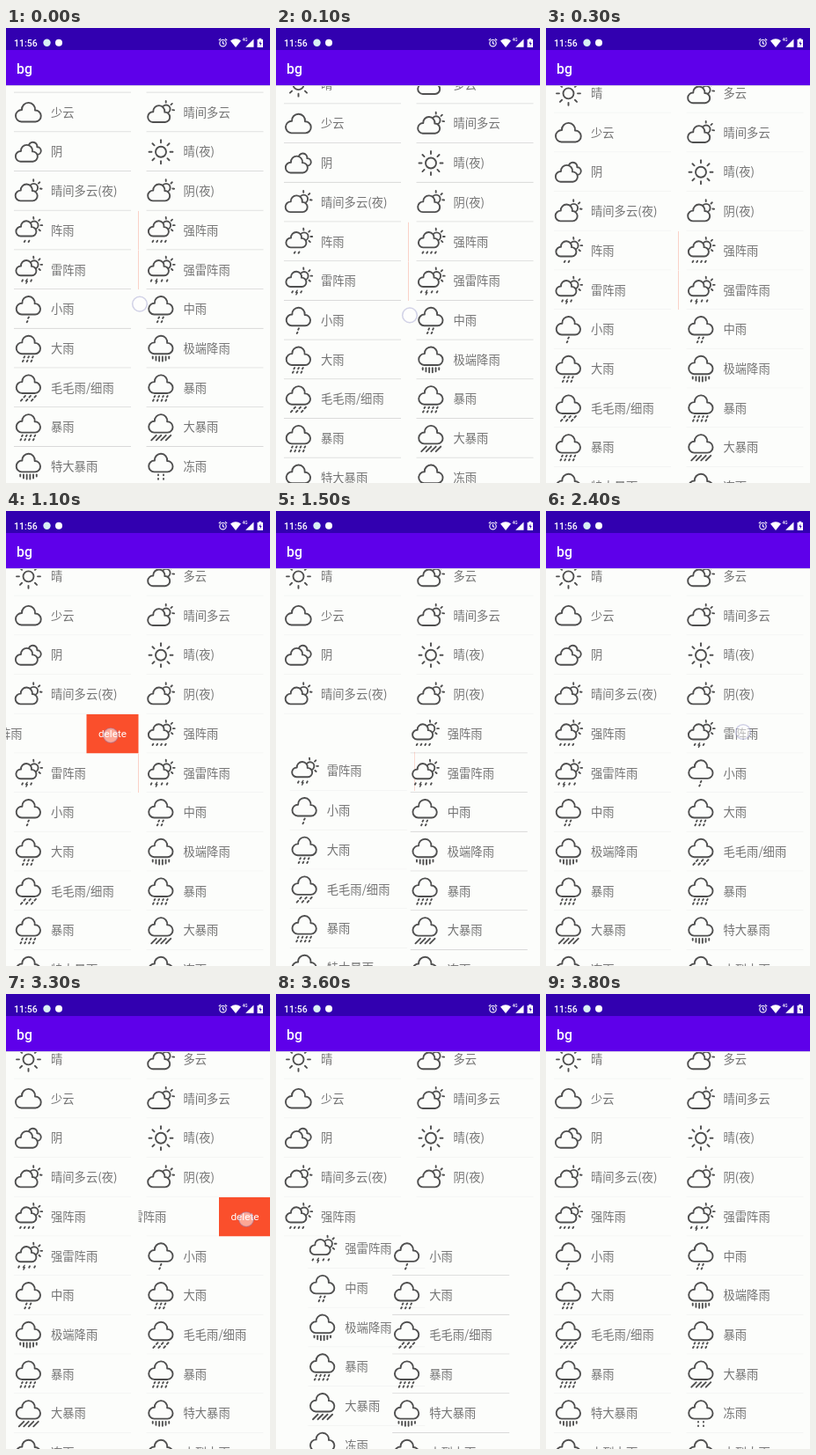
Recreate the animation shown at these times as an HTML page. Size 300x517 px, loop 4500 ms.

```html
<!DOCTYPE html>
<html lang="zh-CN">
<head>
<meta charset="utf-8">
<style>
  html, body { margin: 0; width: 100%; height: 100%; overflow: hidden; background: #fcfdfb; }
  #stage { display: block; width: 100vw; height: 100vh; }
  .label { font: 13.3px "Noto Sans CJK SC", "Noto Sans CJK", sans-serif; fill: #747474; }
  .delete { font: 11.8px Roboto, sans-serif; fill: #fff; text-anchor: middle; }
  .icon { fill: none; stroke: #505050; stroke-width: 1.9; stroke-linecap: round; stroke-linejoin: round; }
  .cloud { fill: #fcfdfb; vector-effect: non-scaling-stroke; }
  .bar { font-family: Roboto, sans-serif; font-weight: 500; fill: #fff; }
</style>
</head>
<body>
<svg id="stage" viewBox="0 0 300 517" preserveAspectRatio="none">
  <rect width="300" height="517" fill="#fcfdfb"/>
  <g id="list"></g>
  <circle id="touch" r="8.3" fill="#fff" fill-opacity=".5" stroke="#8080c0" stroke-opacity=".35" stroke-width="1.5"/>
  <rect y="65" width="300" height="1" fill="#d9d4e4"/>
  <rect y="24" width="300" height="41" fill="#5e00ea"/>
  <rect width="300" height="25" fill="#3200b0"/>
  <g class="bar">
    <text x="9" y="20.8" font-size="10.5">11:56</text>
    <text x="12" y="51.5" font-size="15.8">bg</text>
    <circle cx="46.5" cy="16.8" r="4.2" fill="#d8f0f4"/>
    <circle cx="60" cy="16.8" r="4"/>
    <g fill="none" stroke="#fff" stroke-width="1.1">
      <circle cx="246.5" cy="17.2" r="3.7"/>
      <path d="M246.5 15v2.5l1.7 1M241.8 14.2l2.2-2M251.2 14.2l-2.2-2"/>
    </g>
    <path d="M255 14.6Q261 10 267 14.6L261 22Z"/>
    <text x="268.5" y="14.8" font-size="4.8">4G</text>
    <path d="M281.5 12.5V21.8H272.2Z"/>
    <path d="M287.3 13v-1.2h3V13h1.7v9h-6.4v-9z"/>
    <path d="M289.3 14.5l-1.8 3.3h1.3v2.6l1.8-3.5h-1.3z" fill="#3200b0"/>
  </g>
</svg>
<script>
const LOOP = 4500, STEP = 100;
const CELL_W = 150.5, CELL_H = 44.7, TOP = 52, MENU = 59;

const cloud = (x, y, s = 1) =>
  `<path class="cloud" transform="translate(${x} ${y}) scale(${s})" d="M-8 10.5H8A6.5 6.5 0 0 0 7.5-2.5A7.55 7.55 0 1 0-7.5-3A6.75 6.75 0 0 0-8 10.5Z"/>`;

const rays = (x, y, near, far, angles) => angles.map(deg => {
  const a = deg * Math.PI / 180, c = Math.cos(a), s = Math.sin(a);
  return `<path d="M${x + near * c} ${y + near * s}L${x + far * c} ${y + far * s}"/>`;
}).join('');

const disc = (x, y, r) => `<circle cx="${x}" cy="${y}" r="${r}"/>`;

const columns = (n, gap, draw) =>
  Array.from({ length: n }, (_, i) => draw((i - (n - 1) / 2) * gap, i)).join('');

const dash = (x, y) => `<path d="M${x + .5} ${y}l-.8 1.3"/>`;
const dashes = (n, y) => columns(n, 4.8, x => dash(x, y));
const bolt = x => `<path d="M${x + .6} 9l-1.6 2.4h1.8l-1.4 2.4" stroke-width="1.4"/>`;

const sunBehind = (x, y, angles) => disc(x, y, 4.6) + rays(x, y, 7.4, 9.2, angles);
const shower = extra =>
  sunBehind(6.5, -6, [-95, -45, 0, 42]) + cloud(-2.5, -2, .8) +
  `<g transform="translate(-2 1.5)">${extra}</g>`;
const rain = extra => cloud(0, -4, .95) + extra;
const drizzle = n => rain(dashes(n, 9) + `<g transform="translate(-1.5 0)">${dashes(n, 13.4)}</g>`);

const icons = {
  sun: disc(0, 0, 6) + rays(0, 0, 10.5, 13.5, [0, 45, 90, 135, 180, 225, 270, 315]),
  cloud: cloud(0, 0),
  partly: sunBehind(6, -4, [-92, -42, 8]) + cloud(-2.2, 1.8, .87),
  overcast: cloud(5, -3.8, .65) + cloud(-2, 1.8, .87),
  shower2: shower(dashes(2, 10)),
  shower4: shower(dashes(4, 10)),
  thunder: shower(columns(3, 5, (x, i) => i === 1 ? bolt(x) : dash(x, 10))),
  thunder4: shower(columns(4, 6, (x, i) => i === 1 ? bolt(x) : dash(x, 10))),
  rain1: drizzle(1), rain2: drizzle(2), rain3: drizzle(3), rain4: drizzle(4),
  slant: rain(columns(3, 6, x => `<path d="M${x + 2.5} 9l-1.6 1.7M${x - 1} 13l-1.6 1.7"/>`)),
  heavy: rain(columns(4, 5.5, x => `<path d="M${x + 3} 9.2l-5.5 5.5"/>`)),
  pour: rain(columns(6, 3.7, (x, i) => `<path d="M${x} 9.2v${[2, 4, 5, 5, 4, 2][i]}"/>`)),
  sleet: rain(columns(2, 6, x => `<path d="M${x} 9.2v.7M${x} 13.7v.7"/>`))
};

const items = [
  ['晴', 'sun'], ['多云', 'partly'], ['少云', 'cloud'], ['晴间多云', 'partly'],
  ['阴', 'overcast'], ['晴(夜)', 'sun'], ['晴间多云(夜)', 'partly'], ['阴(夜)', 'partly'],
  ['阵雨', 'shower2'], ['强阵雨', 'shower4'], ['雷阵雨', 'thunder'], ['强雷阵雨', 'thunder4'],
  ['小雨', 'rain1'], ['中雨', 'rain2'], ['大雨', 'rain3'], ['极端降雨', 'pour'],
  ['毛毛雨/细雨', 'slant'], ['暴雨', 'rain4'], ['暴雨', 'rain4'], ['大暴雨', 'heavy'],
  ['特大暴雨', 'pour'], ['冻雨', 'sleet'], ['小到中雨', 'rain2'], ['中到大雨', 'rain3']
];

// Each removal: drag open, press the button, fade out, then close the gap.
const removals = [
  { item: 8, drag: [500, 950], from: 84, press: [1100, 1300], at: [119, 255], fade: 1346, move: 1466 },
  { item: 10, drag: [2400, 2700], from: 224, press: [3300, 3450], at: [273, 256], fade: 3410, move: 3530 }
];

const list = document.getElementById('list');
const touch = document.getElementById('touch');

const menu = `
  <rect x="${CELL_W}" width="${MENU + 1}" height="${CELL_H}" fill="#fa4f2c"/>
  <text class="delete" x="${CELL_W + MENU / 2}" y="26.6">delete</text>`;

list.innerHTML = items.map(([name, icon], k) => `
  <svg width="${CELL_W}" height="${CELL_H}">
    <path class="rule" d="M9 44.2H142"/>
    <g>
      <g class="icon" transform="translate(25.5 22.35)">${icons[icon]}</g>
      <text class="label" x="51" y="27">${name}</text>
      ${removals.some(r => r.item === k) ? menu : ''}
    </g>
  </svg>`).join('');

const cells = [...list.children].map(el => ({
  el, rule: el.querySelector('.rule'), slide: el.querySelector('g')
}));

const span = (t, a, b) => Math.min(1, Math.max(0, (t - a) / (b - a)));
const smooth = p => .5 - .5 * Math.cos(Math.PI * p);
const easeOut = p => 1 - (1 - p) ** 2;
const slot = k => ({ x: (k % 2) * CELL_W, y: TOP + Math.floor(k / 2) * CELL_H });

function render(t) {
  const scroll = -23 * (1 - easeOut(span(t, 0, 300)));
  let finger = t < 300 ? [152, 336.6 + scroll] : null;
  const state = removals.map(r => {
    const open = smooth(span(t, ...r.drag));
    if (t >= r.drag[0] && t < r.drag[1]) finger = [r.from - MENU * open, 251];
    if (t >= r.press[0] && t < r.press[1]) finger = r.at;
    return { ...r, open, alpha: 1 - span(t, r.fade, r.fade + 120), closed: smooth(span(t, r.move, r.move + 250)) };
  });

  cells.forEach(({ el, rule, slide }, k) => {
    let place = k, { x, y } = slot(k), shift = 0, alpha = 1;
    for (const r of state) {
      if (k === r.item) {
        // The button's edge stays out of sight until the drag begins.
        shift = r.open ? -MENU * r.open : 1;
        alpha = r.alpha;
      } else if (k > r.item) {
        const a = slot(place), b = slot(--place);
        x += (b.x - a.x) * r.closed;
        y += (b.y - a.y) * r.closed;
      }
    }
    if (shift > 0) shift = 0.01;
    const moving = state.some(r => k > r.item && r.closed > 0 && r.closed < 1);
    el.setAttribute('x', x);
    el.setAttribute('y', y + scroll);
    el.setAttribute('opacity', alpha);
    slide.setAttribute('transform', `translate(${shift} 0)`);
    rule.setAttribute('stroke', t < 300 || (moving && x > 75) ? '#d9d9d9' : '#f3f4f3');
  });

  touch.setAttribute('visibility', finger ? 'visible' : 'hidden');
  if (finger) touch.setAttribute('transform', `translate(${finger})`);
}

const start = performance.now();
function tick() {
  const t = (performance.now() - start) % LOOP;
  render(Math.floor(t / STEP) * STEP);
  requestAnimationFrame(tick);
}
tick();
</script>
</body>
</html>
```
